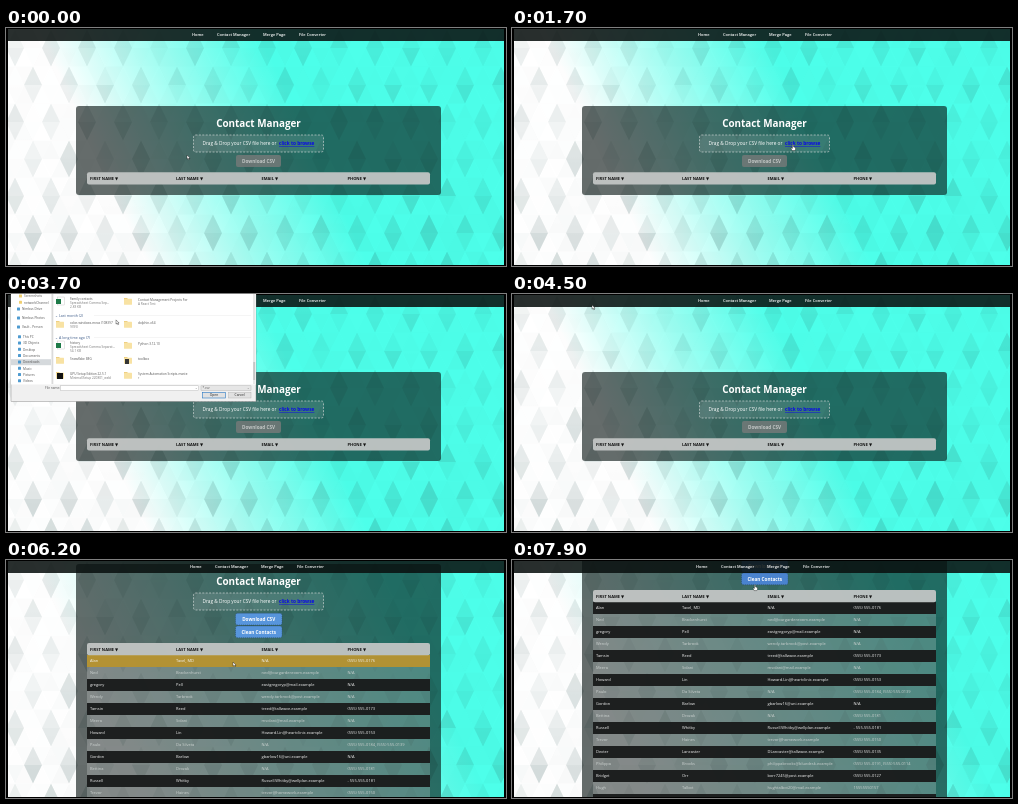
An HTML page that plays this animation: 500x238 px, repeating every 8000 ms.

```html
<!DOCTYPE html>
<html lang="en">
<head>
<meta charset="utf-8">
<title>Contact Manager</title>
<style>
  html, body { margin: 0; width: 100%; height: 100%; overflow: hidden; background: #000; }
  svg { display: block; width: 100vw; height: 100vh; font-family: "Open Sans", "DejaVu Sans", sans-serif; }
</style>
</head>
<body>
<svg id="stage" viewBox="0 0 500 238">
  <defs>
    <linearGradient id="sky" gradientUnits="userSpaceOnUse">
      <stop offset="0" stop-color="#fff"/>
      <stop offset=".5" stop-color="#a0fff3"/>
      <stop offset="1" stop-color="#4dffea"/>
    </linearGradient>
    <linearGradient id="fade" x2="0" y2="1">
      <stop offset="0" stop-color="#fff" stop-opacity=".6"/>
      <stop offset="1" stop-color="#fff"/>
    </linearGradient>
    <mask id="fadeMask"><rect width="500" height="238" fill="url(#fade)"/></mask>
    <clipPath id="screen"><rect x="2" y="1" width="496" height="236"/></clipPath>
  </defs>
  <g clip-path="url(#screen)">
    <rect width="500" height="238" fill="url(#sky)"/>
    <g id="mosaic" mask="url(#fadeMask)"></g>
    <g id="page"></g>
    <g id="nav"></g>
  </g>
  <g id="dialog"></g>
  <g id="arrow"><path d="M0 0V4.2L1.1 3.3L1.8 4.8L2.5 4.5L1.8 3.1H3.1Z" fill="#fff" stroke="#111" stroke-width=".4"/></g>
  <g id="hand"><path d="M-.6 0Q0 -.8 .6 0V2L2.5 2.5V4.4L1.8 5.6H-.9L-2 3.4L-1.3 2.9L-.6 3.4Z" fill="#fff" stroke="#111" stroke-width=".4"/></g>
</svg>
<script>
const NS = "http://www.w3.org/2000/svg";
const LOOP = 8000;
const byId = id => document.getElementById(id);

function add(parent, tag, attrs, content) {
  const node = document.createElementNS(NS, tag);
  for (const key in attrs) node.setAttribute(key, attrs[key]);
  if (content) node.textContent = content;
  parent.appendChild(node);
  return node;
}
const box = (parent, x, y, width, height, fill, more) =>
  add(parent, "rect", { x, y, width, height, fill, ...more });
const label = (parent, x, y, content, size, fill, more) =>
  add(parent, "text", { x, y, "font-size": size, fill, ...more }, content);
const show = (node, on) => node.setAttribute("display", on ? "inline" : "none");
const move = (node, x, y) => node.setAttribute("transform", `translate(${x} ${y})`);
const BOLD = { "font-weight": 700 };
const MID = { "text-anchor": "middle" };

// Triangle mosaic; rows pair up into diamonds.
let seed = 17;
const random = () => (seed = (seed * 16807) % 2147483647) / 2147483647;
function buildMosaic() {
  const w = 9, h = 18.5;
  for (let k = 0; k < 13; k++) {
    for (let j = -1; j < 56; j++) {
      const up = (j + k) % 2 === 0, x = j * w, y = 1.5 + k * h;
      const strong = (j + 2 * Math.floor(k / 2) + 4) % 4 === 0 && up === (k % 2 === 0);
      const opacity = strong ? .07 + random() * .14 : random() * .035;
      const [tip, base] = up ? [y, y + h] : [y + h, y];
      add(byId("mosaic"), "path", {
        d: `M${x} ${base}H${x + 2 * w}L${x + w} ${tip}Z`, fill: "#1f4a48", opacity
      });
    }
  }
}

const columns = [84, 170, 255.5, 341.5];
const contacts = [
  ["Alan", "Tavel, MD", "N/A", "(555) 555-0176"],
  ["Ned", "Brackenhurst", "ned@ourgardenroom.example", "N/A"],
  ["gregory", "Pell", "eastgregoryp@mail.example", "N/A"],
  ["Wendy", "Tarbrook", "wendy.tarbrook@post.example", "N/A"],
  ["Tamsin", "Reed", "treed@tallwave.example", "(555) 555-0173"],
  ["Meera", "Solani", "msolani@mail.example", "N/A"],
  ["Howard", "Lin", "Howard.Lin@heartclinic.example", "(555) 555-0153"],
  ["Paulo", "Da Silveta", "N/A", "(555) 555-0184, (555) 555-0139"],
  ["Gordon", "Barlow", "gbarlow16@uni.example", "N/A"],
  ["Bettina", "Drozak", "N/A", "(555) 555-0181"],
  ["Russell", "Whitby", "Russell.Whitby@wellplan.example", "- 555-555-0181"],
  ["Trevor", "Haines", "trevor@homework.example", "(555) 555-0150"],
  ["Dexter", "Lancaster", "DLancaster@tallwave.example", "(555) 555-0135"],
  ["Philippa", "Brooks", "philippabrooks@bluedesk.example", "(555) 555-0191, (555) 555-0114"],
  ["Bridget", "Orr", "borr7245@post.example", "(555) 555-0127"],
  ["Hugh", "Talbot", "hughtalbot20@mail.example", "15555550157"],
  ["Joanne", "Millard", "N/A", "(555) 555-0162"]
];
const ROW = 12;
const page = byId("page");
let panel, tableHead, emptyButton, loadedPart, cleanButton;
const rows = [];

function button(parent, y, text) {
  const g = add(parent, "g", {});
  const face = box(g, 229.5, y, 46.5, 11.8, "#5795dc", {
    rx: 2, stroke: "#253f63", "stroke-width": .5, "stroke-dasharray": "1 1"
  });
  label(g, 252.7, y + 7.6, text, 4.65, "#fff", { ...BOLD, ...MID });
  return face;
}

// Page coordinates: the panel's top edge is y = 0.
function buildPage() {
  panel = box(page, 70, 0, 365, 89, "#06110f", { rx: 3, "fill-opacity": .61 });
  label(page, 252.5, 21.3, "Contact Manager", 9.9, "#fff", { ...BOLD, ...MID });
  box(page, 187.5, 29, 130, 17, "#fff", {
    rx: 2, "fill-opacity": .1, stroke: "#c9d2d0", "stroke-width": .7, "stroke-dasharray": "2 1.4"
  });
  label(page, 196.5, 39.4, "Drag & Drop your CSV file here or", 4.75, "#fff");
  label(page, 273, 39.4, "click to browse", 4.75, "#0908e8", { ...BOLD, "text-decoration": "underline" });

  emptyButton = add(page, "g", {});
  box(emptyButton, 230, 49, 45, 12, "#747a78", { rx: 2, "fill-opacity": .85 });
  label(emptyButton, 252.5, 56.7, "Download CSV", 4.65, "#c3c7c6", { ...BOLD, ...MID });

  loadedPart = add(page, "g", {});
  button(loadedPart, 49.2, "Download CSV");
  cleanButton = button(loadedPart, 62, "Clean Contacts");
  contacts.forEach((contact, i) => {
    const y = 91 + i * ROW, dark = i % 2 === 0;
    const fill = dark ? "#1b1d1d" : "#fff", opacity = dark ? .97 : .2;
    const rect = box(loadedPart, 81, y, 343, ROW, fill, { "fill-opacity": opacity });
    contact.forEach((text, c) => label(loadedPart, columns[c], y + 7.4, text, 4, dark ? "#f4f4f4" : "#cdd3d1"));
    rows.push({ rect, fill, opacity });
  });

  tableHead = add(page, "g", {});
  box(tableHead, 81, 0, 343, 12.3, "#c3c6c5", { rx: 2, "fill-opacity": .94 });
  ["FIRST NAME", "LAST NAME", "EMAIL", "PHONE"].forEach((text, c) =>
    label(tableHead, columns[c], 7.7, text + " ▼", 4.05, "#111", BOLD));
}

function buildNav() {
  box(byId("nav"), 0, 0, 500, 13, "#0a1110", { "fill-opacity": .87 });
  const links = add(byId("nav"), "g", {});
  const items = { Home: 186, "Contact Manager": 211, "Merge Page": 257, "File Converter": 293 };
  for (const text in items) label(links, items[text], 7.8, text, 4, "#fff", { "font-weight": 600 });
  return links;
}

function folder(g, x, y) {
  box(g, x, y, 3.5, 3, "#ecca78");
  box(g, x, y + .8, 8, 6, "#f8e2a3", { rx: .5 });
}
function sheet(g, x, y) {
  box(g, x + 1.5, y, 7, 8, "#fff", { stroke: "#aaa", "stroke-width": .3 });
  box(g, x, y + 2, 5, 5, "#1e7a48");
}
function buildDialog() {
  const g = byId("dialog"), ink = "#555";
  box(g, 5, 0, 245, 107.5, "#f0f0f0", { stroke: "#777", "stroke-width": .4 });
  box(g, 5, 0, 245, 90.5, "#fff");
  box(g, 5, 65.2, 40, 6, "#d5d9dc");
  const sidebar = (first, step, indent, color, names) => names.forEach((text, i) => {
    const y = first + i * step;
    box(g, indent, y - 2.8, 3, 3, color, { rx: .5 });
    label(g, indent + 5, y, text, 3.2, ink);
  });
  sidebar(3.2, 6.3, 13, "#f0cf70", ["Screenshots", "networkChannel"]);
  sidebar(16.2, 9, 11, "#4f9bd0", ["Nimbus Drive", "Nimbus Photos", "Vault - Person"]);
  sidebar(44, 6.3, 12, "#4f9bd0",
    ["This PC", "3D Objects", "Desktop", "Documents", "Downloads", "Music", "Pictures", "Videos"]);
  box(g, 45.5, 0, 1.8, 90, "#dadada");
  box(g, 247, 0, 2.5, 90, "#e8e8e8");
  box(g, 247.2, 68, 2, 18, "#c6c6c6");
  const group = (y, text) => {
    label(g, 49, y, text, 3.6, "#3d5b88");
    box(g, 88, y - 1.4, 157, .3, "#ddd");
  };
  group(23, "⌄ Last month (2)");
  group(45, "⌄ A long time ago (7)");
  const entry = (icon, x, y, ...lines) => {
    icon(g, x, y);
    lines.forEach((text, i) => label(g, x + 14, y + 3 + i * 4, text, 3.15, i ? "#777" : ink));
  };
  entry(sheet, 50, 3, "Family contacts", "Spreadsheet Comma Sep…", "2.83 KB");
  entry(folder, 118, 4, "Contact Management Projects For", "A React Test");
  entry(folder, 50, 27, "color-windows-meas (108397", "9395)");
  entry(folder, 118, 27, "dolphin-x64");
  entry(sheet, 50, 47, "history", "Spreadsheet Comma Separat…", "54.1 KB");
  entry(folder, 118, 48, "Python 3.12.10");
  entry(folder, 50, 63, "Snowflake IMG");
  entry(folder, 118, 63, "toolbox");
  box(g, 119, 65, 4, 5, "#353535");
  entry(folder, 50, 78, "GPU Setup Edition 22.5.1", "Minimal(Setup 220801_web)");
  box(g, 51, 79, 6, 6, "#111");
  entry(folder, 118, 78, "System Automation Scripts-maste", "r");

  label(g, 39, 95.2, "File name:", 3.2, ink);
  box(g, 54.5, 91.8, 138, 4.8, "#fff", { stroke: "#aaa", "stroke-width": .4 });
  box(g, 195, 91.8, 50, 4.8, "#e6e6e6", { stroke: "#aaa", "stroke-width": .4 });
  label(g, 196.5, 95.3, "*.csv", 3.1, ink);
  label(g, 189, 95.2, "⌄", 3, ink);
  label(g, 241, 95.2, "⌄", 3, ink);
  box(g, 196.5, 98.4, 23, 5.6, "#e1e1e1", { stroke: "#2878c4", "stroke-width": .6 });
  box(g, 222.5, 98.4, 22.5, 5.6, "#e1e1e1", { stroke: "#aaa", "stroke-width": .4 });
  label(g, 208, 102.4, "Open", 3.3, "#222", MID);
  label(g, 233.7, 102.4, "Cancel", 3.3, "#222", MID);
}

const ease = u => u * u * (3 - 2 * u);
const span = (t, from, to) => Math.min(1, Math.max(0, (t - from) / (to - from)));

// Pointer stops: time, x, y.
const path = [
  [0, 181, 127], [500, 181, 127], [1400, 281, 117], [2000, 281, 117], [2700, 219, 80],
  [3000, 219, 80], [4000, 80, 11], [4600, 80, 11], [5200, 183, 80], [6100, 227, 102],
  [7100, 227, 102], [7800, 243, 25], [8000, 243, 25]
];
function pointerAt(t) {
  const i = Math.max(1, path.findIndex(p => p[0] > t));
  const [t0, x0, y0] = path[i - 1], [t1, x1, y1] = path[i];
  const u = ease(span(t, t0, t1));
  return [x0 + (x1 - x0) * u, y0 + (y1 - y0) * u];
}

buildMosaic();
buildPage();
buildDialog();
const navLinks = buildNav();

function setSky(loaded) {
  const [x1, y1, x2, y2] = loaded ? [105, 170, 390, 40] : [92, 130, 272, 45];
  Object.entries({ x1, y1, x2, y2 }).forEach(([key, value]) => byId("sky").setAttribute(key, value));
}

function render(t) {
  const loaded = t >= 4700;
  const scroll = 53 * (1 - (1 - span(t, 6600, 7100)) ** 2.6);
  const top = loaded ? 4 - scroll : 78;
  const [x, y] = pointerAt(t);

  setSky(loaded);
  move(page, 0, top);
  panel.setAttribute("height", loaded ? 400 : 89);
  move(tableHead, 0, loaded ? 79 : 66.3);
  move(navLinks, loaded ? -2 : 0, 0);
  show(emptyButton, !loaded);
  show(loadedPart, loaded);
  show(byId("dialog"), t >= 2000 && t < 4400);

  // Hover stays on its row until scrolling stops.
  const hoverTop = t < 7100 ? 4 : top;
  const hovered = loaded ? Math.floor((y - hoverTop - 91) / ROW) : -1;
  rows.forEach(({ rect, fill, opacity }, i) => {
    rect.setAttribute("fill", i === hovered ? "#b99532" : fill);
    rect.setAttribute("fill-opacity", i === hovered ? .95 : opacity);
  });

  const onClean = loaded && y > top + 62 && y < top + 75 && x > 229 && x < 276;
  cleanButton.setAttribute("fill", onClean ? "#4a83cf" : "#5795dc");
  const pointing = onClean || (t >= 1300 && t < 2000);
  show(byId("hand"), pointing);
  show(byId("arrow"), !pointing);
  move(byId(pointing ? "hand" : "arrow"), x, y);
}

const start = performance.now();
function frame() {
  const t = (performance.now() - start) % LOOP;
  render(Math.floor(t / 100) * 100);
  requestAnimationFrame(frame);
}
frame();
</script>
</body>
</html>
```
